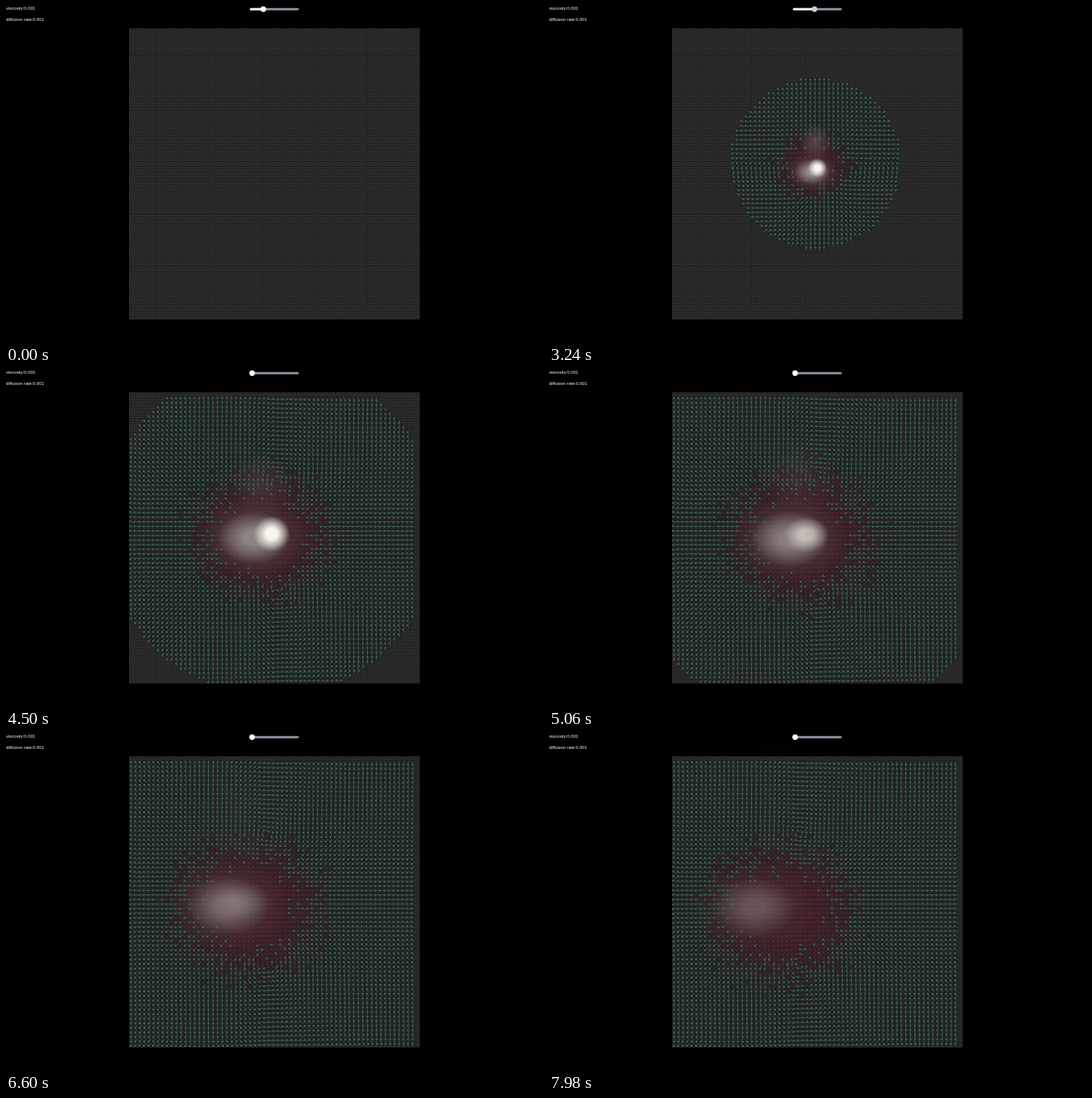
An HTML page with a canvas for the animation above (8 s loop, 720x450 px).

```html
<!DOCTYPE html>
<html lang="en">
<head>
<meta charset="utf-8">
<title>Fluid simulation</title>
<style>
  html, body { margin: 0; width: 100%; height: 100%; overflow: hidden; background: #000; }
  canvas { display: block; }
</style>
</head>
<body>
<canvas id="stage" width="720" height="450"></canvas>
<script>
const ctx = document.getElementById('stage').getContext('2d');
const LOOP = 8, START = 2.8, EMIT = 1.8; // seconds
const LEFT = 165, TOP = 30, SIZE = 389.5, CELLS = 64, STEP = SIZE / CELLS;

const ramp = (t, from, to) => {
  const k = Math.min(1, Math.max(0, (t - from) / (to - from)));
  return k * k * (3 - 2 * k);
};
const settle = (s, tau) => 1 - Math.exp(-s / tau);
const hash = (i, j) => {
  const v = Math.sin(i * 12.9898 + j * 78.233) * 43758.5453;
  return v - Math.floor(v);
};

function blob({ x, y, rx, ry }, rgb, alpha, solid = .1) {
  ctx.save();
  ctx.translate(x, y);
  ctx.scale(rx, ry);
  const g = ctx.createRadialGradient(0, 0, 0, 0, 0, 1);
  g.addColorStop(solid, `rgba(${rgb},${alpha})`);
  g.addColorStop((1 + solid) / 2, `rgba(${rgb},${alpha * .5})`);
  g.addColorStop(1, `rgba(${rgb},0)`);
  ctx.fillStyle = g;
  ctx.fillRect(-1, -1, 2, 2);
  ctx.restore();
}

// Still cells: a fine grid of dots.
const still = document.createElement('canvas');
still.width = still.height = 390;
{
  const s = still.getContext('2d');
  s.fillStyle = '#242426';
  s.fillRect(0, 0, 390, 390);
  s.fillStyle = '#363638';
  for (let y = 0; y < 128; y++)
    for (let x = 0; x < 128; x++)
      s.fillRect(Math.round(x * STEP / 2), Math.round(y * STEP / 2), 2, 1);
}

// The state of the flow, s seconds after the jet starts.
function flowAt(s) {
  const turn = -Math.PI / 2 * (1 + ramp(s, .5, 1.5));
  const growth = settle(s, .7);
  return {
    reach: 172 * Math.sqrt(s),
    x: 367 - 1.2 * s * s, y: 221,
    cos: Math.cos(turn), sin: Math.sin(turn),
    gap: 88 * settle(s, 1.1),
    inflow: 1.3 * Math.exp(-1.2 * s),
    heat: { x: 358 - 9 * s, y: 212 + 5 * s, rx: 120 * growth, ry: 110 * growth },
  };
}

// Vortex pair, plus a radial push ahead of the jet and a pull behind it.
function direction(x, y, f) {
  const dx = x - f.x, dy = y - f.y;
  const a = dx * f.cos + dy * f.sin, b = dy * f.cos - dx * f.sin;
  const r = Math.hypot(a, b) + 1;
  const radial = Math.tanh(a / 22) * (a > 0 ? 1.3 : f.inflow) * f.gap / (r + 20) / r;
  let va = a * radial, vb = b * radial;
  for (const side of [1, -1]) {
    const q = b - side * f.gap, d = side * f.gap / (a * a + q * q + 40);
    va -= q * d;
    vb += a * d;
  }
  // Flow turns parallel to the walls.
  const wallX = settle(Math.min(x - LEFT, LEFT + SIZE - x), 9);
  const wallY = settle(Math.min(y - TOP, TOP + SIZE - y), 9);
  return Math.atan2((va * f.sin + vb * f.cos) * wallY, (va * f.cos - vb * f.sin) * wallX);
}

function drawFlow(f) {
  const ground = new Path2D(), cool = new Path2D(), tips = new Path2D(), warm = new Path2D();
  for (let j = 1; j < CELLS; j++) for (let i = 0; i < CELLS - 1; i++) {
    const x = LEFT + (i + .5) * STEP, y = TOP + (j + .5) * STEP;
    if (Math.hypot(x - 358, y - 212) > f.reach) continue;
    ground.rect(x - STEP / 2, y - STEP / 2, STEP + .1, STEP + .1);
    const angle = direction(x, y, f), c = Math.cos(angle) * 2.7, s = Math.sin(angle) * 2.7;
    const d = Math.hypot((x - f.heat.x) / f.heat.rx, (y - f.heat.y) / f.heat.ry);
    const isHot = hash(i, j) < 1.6 * Math.exp(-2 * d * d) - .15;
    const body = isHot ? warm : cool, head = isHot ? warm : tips;
    body.moveTo(x - c, y - s);
    body.lineTo(x + c, y + s);
    for (const turn of [2.5, -2.5]) {
      head.moveTo(x + c, y + s);
      head.lineTo(x + c + 2.2 * Math.cos(angle + turn), y + s + 2.2 * Math.sin(angle + turn));
    }
  }
  ctx.fillStyle = '#202322';
  ctx.fill(ground);
  blob(f.heat, '66,30,40', .85, .3);
  ctx.lineWidth = .8;
  for (const [path, colour] of [[cool, '#42684c'], [tips, '#528a7c'], [warm, 'rgba(112,44,58,.7)']]) {
    ctx.strokeStyle = colour;
    ctx.stroke(path);
  }
}

// A drifting cloud, its first puff going up, and the bright core at the emitter.
function drawDye(s) {
  const growth = settle(s, .8), fade = Math.exp(-((s / 5.4) ** 2));
  const x = 360 - 16.3 * s, y = 221 + 2.2 * s;
  const puff = 14 + 16 * s;
  blob({ x: 362 - 12 * s, y: 192 - 22 * s, rx: puff, ry: puff * 1.2 }, '108,98,100', .7 * Math.exp(-s / 1.5));
  blob({ x, y, rx: 82 * growth, ry: 60 * growth }, '82,74,66', .75 * fade, .3);
  blob({ x, y, rx: 56 * growth, ry: 40 * growth }, '152,144,142', .95 * fade, .25);
  const core = 9 + 9 * s;
  blob({ x: 360 - 19 * Math.max(0, s - 1.5), y: 216 + 2 * s, rx: core, ry: Math.min(core, 24) },
    '250,246,238', Math.min(1, Math.exp((EMIT - s) / .8)), .3);
}

function drawControls(t) {
  ctx.fillStyle = '#fff';
  ctx.font = '6px "Liberation Sans", Arial, sans-serif';
  ctx.fillText('viscosity:0.001', 0, 5);
  ctx.fillText('diffusion rate:0.001', 0, 20);
  const x = 345 + 11 * ramp(t, 2.8, 3.2) - 26 * ramp(t, 3.4, 4.3);
  ctx.lineCap = 'round';
  ctx.lineWidth = 3;
  for (const [to, colour] of [[391, '#9494a8'], [x, '#f4f4f4']]) {
    ctx.strokeStyle = colour;
    ctx.beginPath();
    ctx.moveTo(328.5, 4.3);
    ctx.lineTo(to, 4.3);
    ctx.stroke();
  }
  ctx.lineCap = 'butt';
  ctx.fillStyle = t > 2.58 && t < 4.3 ? '#cdcdcd' : '#fff';
  ctx.beginPath();
  ctx.arc(x, 4.2, 3.7, 0, 7);
  ctx.fill();
}

function draw(now) {
  const t = now / 1000 % LOOP;
  ctx.fillStyle = '#000';
  ctx.fillRect(0, 0, 720, 450);
  ctx.drawImage(still, LEFT, TOP);
  if (t > START) {
    drawFlow(flowAt(t - START));
    drawDye(t - START);
  }
  drawControls(t);
  requestAnimationFrame(draw);
}
requestAnimationFrame(draw);
</script>
</body>
</html>
```
